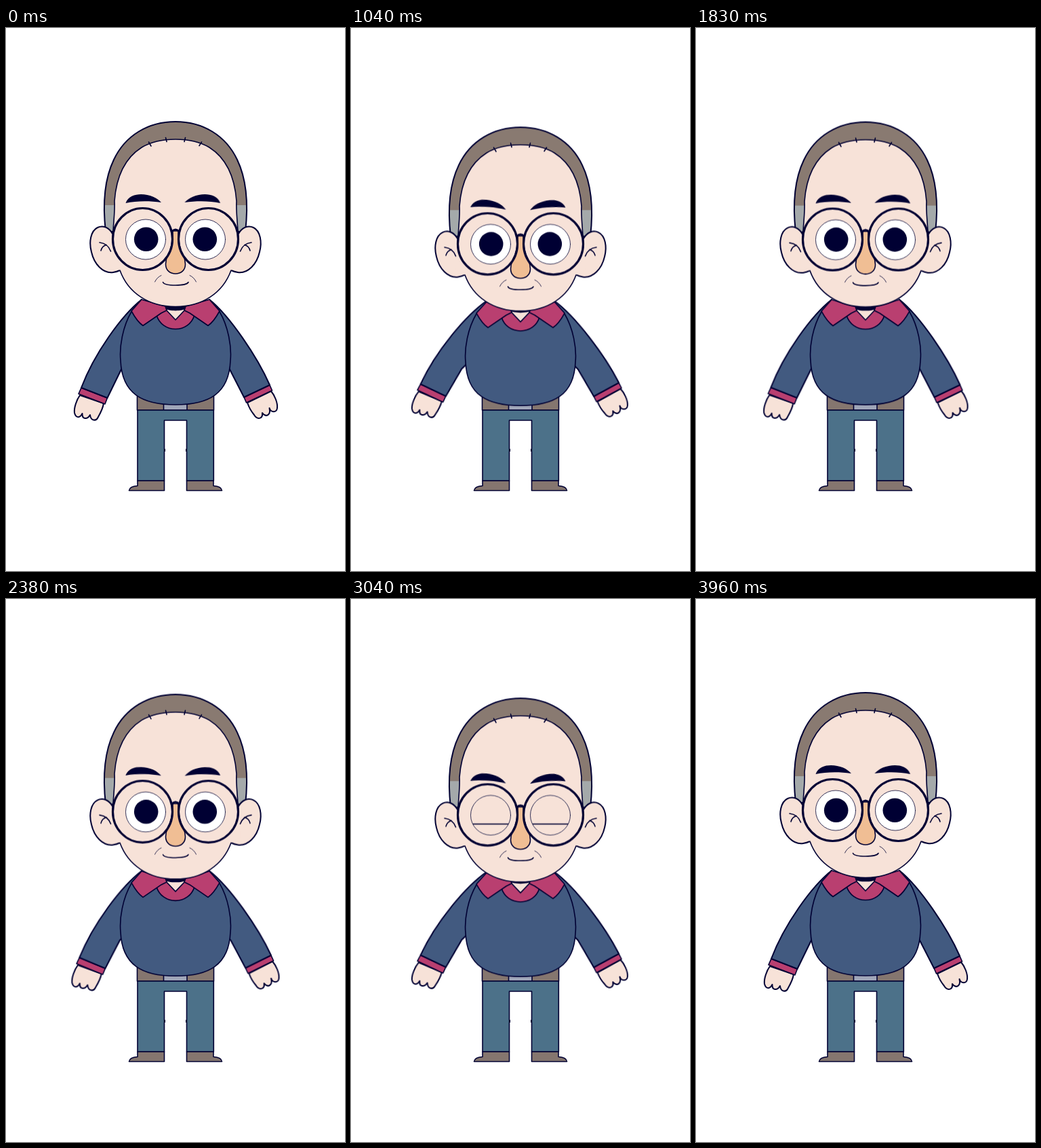
These frames come from a looping animation (500 px wide and 800 px high, 4000 ms). An HTML page:

```html
<!DOCTYPE html>
<html lang="en">
<head>
<meta charset="utf-8">
<title>Breathing man</title>
<style>
  html, body { margin: 0; width: 100%; height: 100%; overflow: hidden; background: #fff; }
  svg { display: block; width: 100vw; height: 100vh; }

  .ink { stroke: #000033; stroke-width: 1.6; stroke-linecap: round; stroke-linejoin: round; }
  .line { fill: none; }
  .thin { stroke-width: .8; }
  .edge { stroke-width: 2; }
  .rim { stroke-width: 3.2; }
  .skin { fill: #f7e2d8; }
  .knit { fill: #425a80; }
  .pink { fill: #b93f70; }
  .denim { fill: #4c7189; }
  .brown { fill: #85766f; }
  .dark { fill: #000033; }

  /* One breath: 1 s down, 1 s up. */
  .breath { animation: 1s cubic-bezier(.37, 0, .63, 1) infinite alternate; }
  .head { animation-name: head; transform-origin: 250px 411px; }
  .body { animation-name: body; transform-origin: 250px 555px; }
  .arm-l { animation-name: arm-l; transform-origin: 200px 411px; }
  .arm-r { animation-name: arm-r; transform-origin: 303px 411px; }
  .brow-l { animation-name: brow-l; transform-origin: 202px 252px; }
  .brow-r { animation-name: brow-r; transform-origin: 298px 252px; }
  @keyframes head { to { transform: translateY(6.4px) scaleY(.993); } }
  @keyframes body { to { transform: translateY(1.4px) scaleY(.988); } }
  @keyframes arm-l { to { transform: translateY(1.5px) rotate(4.2deg); } }
  @keyframes arm-r { to { transform: translateY(1.5px) rotate(-3.1deg); } }
  @keyframes brow-l { to { transform: translateY(.8px) rotate(5deg); } }
  @keyframes brow-r { to { transform: translateY(.8px) rotate(-5deg); } }

  /* One blink per loop. */
  .blink { animation: 4s ease-in-out infinite; }
  .lid-top { animation-name: lid-top; }
  .lid-low { animation-name: lid-low; }
  .frown { animation-name: frown; }
  @keyframes lid-top { 0%, 72%, 80%, 100% { transform: none; } 75%, 77% { transform: translateY(44.5px); } }
  @keyframes lid-low { 0%, 72%, 80%, 100% { transform: none; } 75%, 77% { transform: translateY(-18.5px); } }
  @keyframes frown { 0%, 72%, 80%, 100% { transform: none; } 75%, 77% { transform: translateY(4px); } }
</style>
</head>
<body>
<svg viewBox="0 0 500 800">
  <defs>
    <linearGradient id="hair" gradientUnits="userSpaceOnUse" x1="0" y1="161" x2="0" y2="361">
      <stop offset=".5" stop-color="#897a71"/>
      <stop offset=".5" stop-color="#a4a9aa"/>
    </linearGradient>
    <clipPath id="eyes">
      <circle cx="206" cy="311.5" r="29.5"/>
      <circle cx="294" cy="311.5" r="29.5"/>
    </clipPath>
    <path id="ear" class="ink edge skin" d="M157 303C152 294 143 290 135 294C125 299 122 315 126 330C130 348 143 362 158 360C162 359.5 165 358.5 168 357"/>
    <g id="ear-fold" class="ink line">
      <path d="M138 316C146 317 152 322 154.500 329"/>
      <path d="M148 319.500C143 321 141 324 140 328"/>
    </g>
    <path id="brow" class="dark" d="M176.500 258C180 248 190 245 199 245C212 245 223 250 229 257C212 254.500 192 254.500 176.500 258Z"/>
    <path id="flap" class="ink pink" d="M200 400L185 417C191 428 196 434.500 202 438.500L229 420L237 416L235 410Z"/>
    <g id="leg">
      <path class="ink brown" d="M194 667V674.500C187 675 182 677 181.500 681.500H233.500V667Z"/>
      <path class="dark" d="M233.500 620h1.500v4h-1.500z"/>
    </g>
    <g id="eye">
      <circle fill="#fff" cx="206" cy="311.5" r="29.5"/>
      <circle class="dark" cx="206.700" cy="311.2" r="17.800"/>
    </g>
  </defs>

  <!-- Legs and belt -->
  <path class="ink brown" d="M193.500 540H306.500V563H193.500Z"/>
  <path class="ink" fill="#a0a6b9" d="M232.500 550H267V563H232.500Z"/>
  <path class="ink denim" d="M194 563H306.300V667H266.500V578H233.500V667H194Z"/>
  <use href="#leg"/>
  <use href="#leg" transform="matrix(-1 0 0 1 500 0)"/>

  <!-- Arms -->
  <g class="breath arm-l">
    <path class="ink edge skin" d="M109 541C104 548 100 560 101 567C103 575 109 575 112.500 568C112 577 120 577 124 570C125 579 133 580 136 573C140 566 143 560 144 553Z"/>
    <path class="ink pink" d="M111 530L149.500 545L146 554L107 539Z"/>
    <path class="ink edge knit" d="M200 400C170 424 130 480 111 530L149.500 545L170 503L200 470Z"/>
  </g>
  <g class="breath arm-r">
    <path class="ink edge skin" d="M391 535C396 541 401 552 400 560C399 567 391 567 388.500 560C391 571 383 574 378 567C379 577 370 577 366 570C361 564 358 558 356 552Z"/>
    <path class="ink pink" d="M351 544L389 526L392.500 534L354.500 552Z"/>
    <path class="ink edge knit" d="M300 400C330 424 371 485 389 526L351 544L330 503L300 470Z"/>
  </g>

  <!-- Torso and collar -->
  <g class="breath body">
    <path class="ink knit" d="M200 402L185 418C172 440 167 470 169 490C171 539 201 555 250 555C299 555 329 539 331 490C333 470 328 440 315 418L300 402Z"/>
    <path class="ink pink" d="M222 423C226 436 237 443.500 250 443.500C263 443.500 274 436 278 423L266 408H234Z"/>
    <path class="ink skin" d="M234 406V413L250 430L266 413V406Z"/>
    <path class="dark" d="M233 405V413C240 417.500 260 417.500 267 413V405Z"/>
    <use href="#flap"/>
    <use href="#flap" transform="matrix(-1 0 0 1 500 0)"/>
  </g>

  <!-- Head -->
  <g class="breath head">
    <path class="ink edge" fill="url(#hair)" d="M147 300C143 265 144 225 159 194C176 158 210 138 250 138C290 138 324 158 341 194C356 225 357 265 353 300Z"/>
    <use href="#ear"/>
    <use href="#ear" transform="matrix(-1 0 0 1 500 0)"/>
    <path class="skin" d="M158 303C158 290 161 270 160 255C163 215 178 190 200 176C215 167 232 164 250 164C268 164 285 167 300 176C322 190 337 215 340 255C339 270 342 290 342 303L348 320L345 350L332 357C320 390 290 410.500 250 410.500C210 410.500 180 390 168 357L155 350L152 320Z"/>
    <path class="ink line" d="M158 303C158 290 161 270 160 255C163 215 178 190 200 176C215 167 232 164 250 164C268 164 285 167 300 176C322 190 337 215 340 255C339 270 342 290 342 303"/>
    <path class="ink line" d="M168 357C180 390 210 410.500 250 410.500C290 410.500 320 390 332 357"/>
    <path class="ink line" d="M210.500 168L214 174M235.500 161.500L237 167.500M264.500 161.500L263 167.500M288.500 168L285 173.500"/>
    <use href="#ear-fold"/>
    <use href="#ear-fold" transform="matrix(-1 0 0 1 500 0)"/>

    <path class="ink" fill="#f0be94" d="M246 299C246 316 244 325 239 334C236.500 339 235.500 343 235.500 348C235.500 357 242 362 250 362C258 362 264.500 357 264.500 348C264.500 343 263.500 339 261 334C256 325 254 316 254 299Z"/>
    <path class="ink line" d="M231.500 374.500C233 378 240 379 250 379C260 379 267 378 269 374.500"/>
    <path class="ink line thin" d="M219.500 374Q223 367 229 364.500M280.500 374Q277 367 271 364.500"/>

    <use href="#eye"/>
    <use href="#eye" transform="matrix(-1 0 0 1 500 0)"/>
    <g clip-path="url(#eyes)">
      <path class="ink skin blink lid-low" d="M170 343H330V400H170Z"/>
      <path class="ink skin blink lid-top" d="M170 200H330V280H170Z"/>
    </g>
    <g class="ink line thin">
      <circle cx="206" cy="311.5" r="29.5"/>
      <circle cx="294" cy="311.5" r="29.5"/>
    </g>

    <g class="ink line rim">
      <ellipse cx="201.500" cy="311" rx="44" ry="45.500"/>
      <ellipse cx="298.500" cy="311" rx="44" ry="45.500"/>
      <path d="M244.500 300Q250 294 255.500 300"/>
    </g>

    <g class="blink frown">
      <g class="breath brow-l"><use href="#brow"/></g>
      <g class="breath brow-r"><use href="#brow" transform="matrix(-1 0 0 1 492.500 0)"/></g>
    </g>
  </g>
</svg>
</body>
</html>
```
